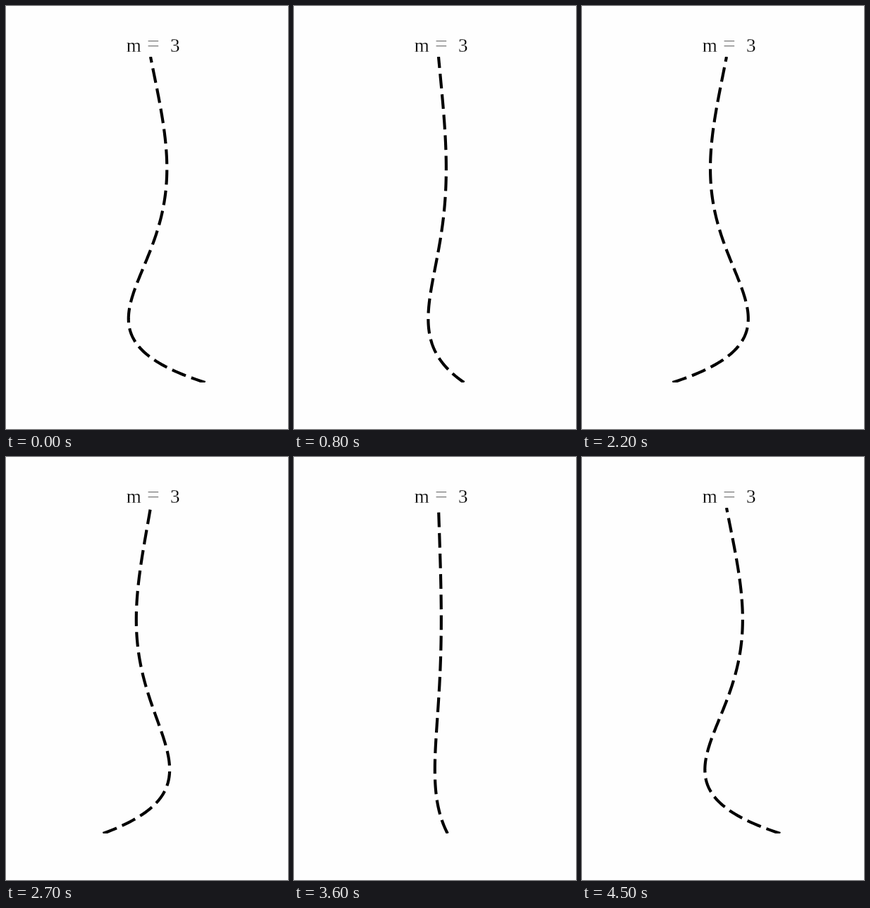
An HTML page for the animation above (4600 ms loop, 400x600 px).

```html
<!DOCTYPE html>
<html lang="en">
<head>
<meta charset="utf-8">
<title>Hanging chain, third mode</title>
<style>
  html, body { margin: 0; width: 100%; height: 100%; overflow: hidden; background: #fefefe; }
  svg { display: block; }
  text { font: 27px "Liberation Serif", serif; stroke: #fefefe; stroke-width: .3px; }
  .equals { font-size: 33px; stroke-width: .8px; }
  #chain { fill: none; stroke: #000; stroke-width: 4.167; stroke-dasharray: 20.833 8.333; }
</style>
</head>
<body>
<svg width="400" height="600" viewBox="0 0 400 600">
  <clipPath id="plot"><rect x="50" y="72" width="310" height="462"/></clipPath>
  <text y="65"><tspan x="170.8">m </tspan><tspan class="equals" x="199.4">=</tspan><tspan x="226.3"> 3</tspan></text>
  <g clip-path="url(#plot)"><path id="chain"/></g>
</svg>
<script>
  const ROOT = 8.653728;                        // third zero of J0
  const OMEGA = ROOT / 2 * Math.sqrt(9.81);     // chain of unit length
  const STEP = 100, STEPS = 46, DT = 0.01;
  const CENTER = 205, BOTTOM = 534, LENGTH = 462, SWING = 77.5, POINTS = 200;
  const chain = document.getElementById('chain');

  // Power series of the Bessel function J0
  function bessel0(z) {
    const q = -z * z / 4;
    let term = 1, sum = 1;
    for (let k = 1; k < 36; k++) {
      term *= q / (k * k);
      sum += term;
    }
    return sum;
  }

  const shape = Array.from({ length: POINTS + 1 },
    (_, i) => bessel0(ROOT * Math.sqrt(i / POINTS)));

  function draw(step) {
    const swing = SWING * Math.cos(OMEGA * DT * step);
    const points = shape.map((u, i) =>
      (CENTER + swing * u).toFixed(3) + ',' + (BOTTOM - LENGTH * i / POINTS).toFixed(3));
    chain.setAttribute('d', 'M' + points.join('L'));
  }

  const start = performance.now();
  function tick() {
    draw(Math.floor((performance.now() - start) / STEP) % STEPS);
    requestAnimationFrame(tick);
  }
  tick();
</script>
</body>
</html>
```
